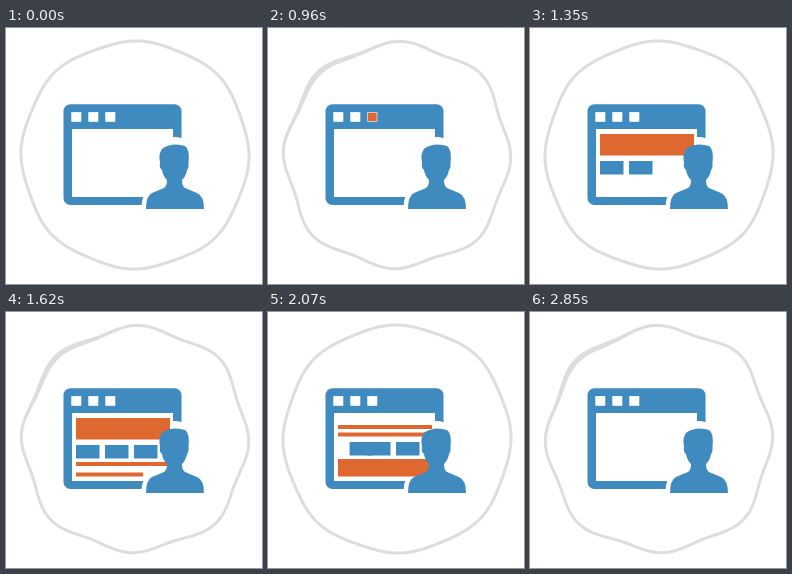
Recreate the animation shown at these times as an HTML page. Size 256 by 256 pixels, loop 2.88 s.

```html
<!DOCTYPE html>
<html lang="en">
<head>
<meta charset="utf-8">
<title>Page builder icon</title>
<style>
  html, body { margin: 0; width: 100%; height: 100%; overflow: hidden; background: #fff; }
  svg { display: block; width: 100%; height: 100%; }
  .blue { fill: #3f8bbf; }
  .orange { fill: #de6830; }
  .white { fill: #fff; }
</style>
</head>
<body>
<svg viewBox="0 0 256 256">
  <path id="ring" fill="#dddddf" fill-rule="evenodd"/>
  <rect class="blue" x="57.5" y="76.3" width="118" height="100.7" rx="7"/>
  <rect class="white" x="66" y="101" width="101" height="68"/>
  <g id="buttons" stroke="#fff" stroke-width=".6"></g>
  <circle class="white" cx="169" cy="126" r="17"/>
  <use href="#person" fill="#fff" stroke="#fff" stroke-width="9" stroke-linejoin="round"/>
  <g id="content"></g>
  <g class="blue">
    <path id="person" d="M140 181Q140 168 146 165L158 160Q161 158 161 152Q157 148 156 142Q153 140 154 135Q152 124 157 120Q167 114 179 118Q184 121 182.5 135Q183 140 181 142Q180 148 176 152Q176 158 179 160L191 165Q198 168 198 181Z"/>
  </g>
</svg>
<script>
const LOOP = 2880, STEP = 30, BOIL = 150;
const $ = id => document.getElementById(id);

function addRect(parent, color) {
  const rect = document.createElementNS('http://www.w3.org/2000/svg', 'rect');
  rect.setAttribute('class', color);
  return $(parent).appendChild(rect);
}

function place(rect, x, y, width, height) {
  Object.entries({ x, y, width, height }).forEach(([name, v]) => rect.setAttribute(name, v));
}

const progress = (t, from, to) => Math.min(1, Math.max(0, (t - from) / (to - from)));
const mix = (a, b, k) => a + (b - a) * k;

// Rounded octagon: the last two of the four poses are rougher, with a heavy upper-left stroke.
function ringPath(pose) {
  const rough = pose > 1;
  const bump = rough ? 3 : 1.2;
  const turn = (pose % 2 - .5) * .06;
  const edge = inset => {
    let path = '';
    for (let degrees = 0; degrees < 360; degrees += 3) {
      const angle = degrees * Math.PI / 180;
      const upperLeft = Math.max(0, Math.cos(angle - 3.95)) ** 12;
      const radius = (rough ? 113.8 : 115) + bump * (Math.cos(8 * (angle + turn)) - Math.cos(4 * angle) / 2)
        - (rough ? 2 * upperLeft : 0) - inset * (3 + (rough ? 2.5 * upperLeft : 0));
      path += `${path ? 'L' : 'M'}${129 + radius * Math.cos(angle)} ${127 + radius * Math.sin(angle)}`;
    }
    return path + 'Z';
  };
  return edge(0) + edge(1);
}

const rings = [0, 1, 2, 3].map(ringPath);
const buttons = [0, 1, 2].map(i => {
  const button = addRect('buttons', 'white');
  place(button, 65.7 + i * 17, 84.3, 9.3, 9.3);
  return button;
});
const banner = addRect('content', 'orange');
const lines = [0, 1].map(() => addRect('content', 'orange'));
const blocks = [0, 1, 2].map(() => addRect('content', 'blue'));

function draw(time) {
  const t = Math.floor(time % LOOP / STEP) * STEP;
  $('ring').setAttribute('d', rings[Math.floor(t / BOIL) % 4]);

  // The title-bar buttons light up one after another.
  buttons.forEach((button, i) => {
    const start = 720 + i * 120;
    button.setAttribute('class', t >= start && t < start + 120 ? 'orange' : 'white');
  });

  // Parts grow in, the banner trades places with the lines, then two blocks swap.
  const down = progress(t, 1650, 1842);
  const up = progress(t, 1860, 1980);
  place(banner, 70, mix(106, 147, down), 94 * progress(t, 1080, 1230), mix(21.5, 17.5, down));
  lines.forEach((line, i) => {
    const start = 1440 + i * 105;
    const y = mix(150 + i * 10.5, 113 + i * 7.5, up);
    place(line, 70, y, 94 * progress(t, start, start + 105), 4);
  });
  const swap = [progress(t, 2010, 2160), -progress(t, 2160, 2280), 0];
  blocks.forEach((block, i) => {
    const start = 1230 + i * 60;
    const x = 70 + (i + swap[i]) * 29;
    place(block, x, mix(133, 130, up), 23.5 * progress(t, start, start + 60), 13.5);
  });
  $('content').setAttribute('opacity', 1 - progress(t, 2670, 2820));
}

const begin = performance.now();
function frame() {
  draw(performance.now() - begin);
  requestAnimationFrame(frame);
}
frame();
</script>
</body>
</html>
```
